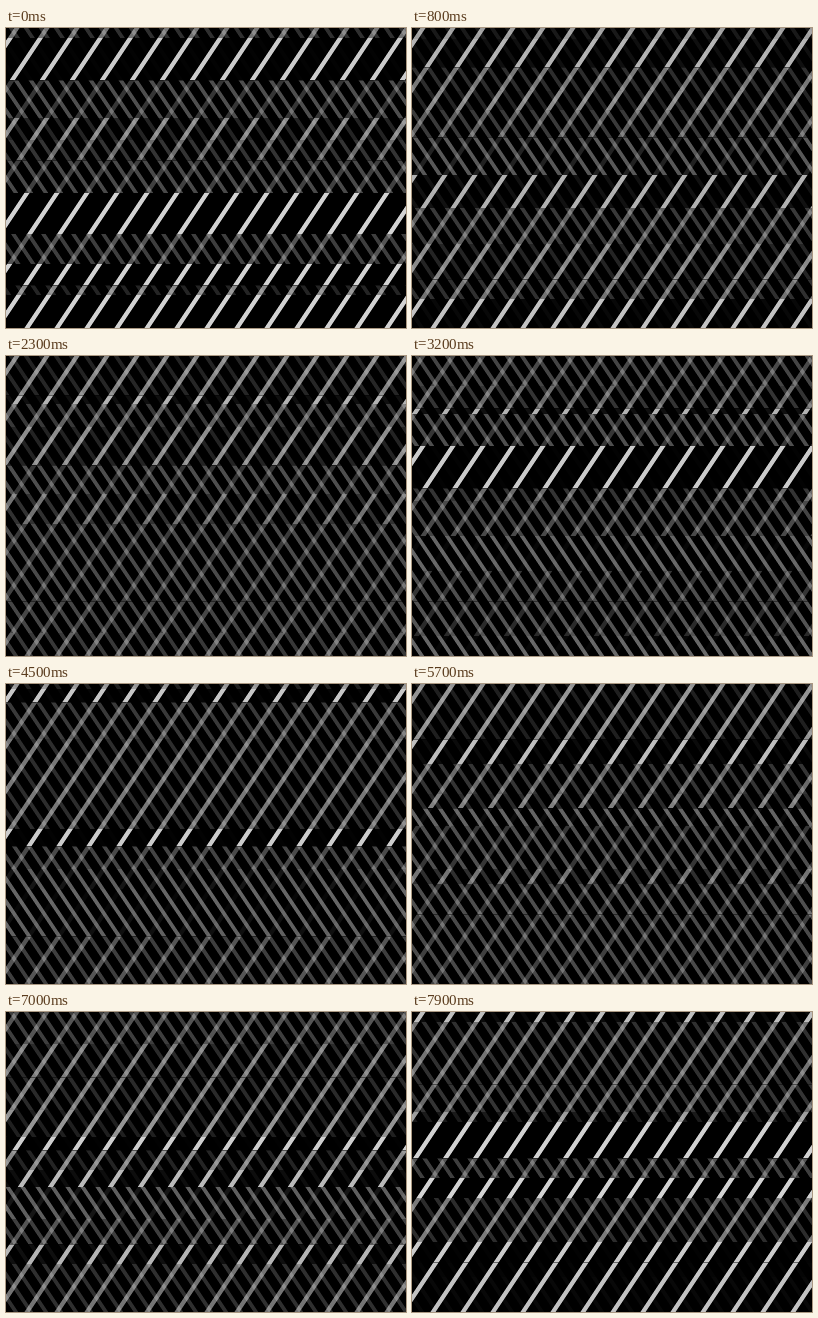
Recreate the animation shown at these times as an HTML page without scripts. Size 400 by 300 pixels, loop 8000 ms.

```html
<!DOCTYPE html>
<html lang="en">
<head>
<meta charset="utf-8">
<title>Crossing hatch</title>
<style>
/* e1–e10: row edges; v0–v10: share of the falling hatch in each row */
@property --e1 { syntax: "<length>"; inherits: true; initial-value: 0px }
@property --e2 { syntax: "<length>"; inherits: true; initial-value: 0px }
@property --e3 { syntax: "<length>"; inherits: true; initial-value: 0px }
@property --e4 { syntax: "<length>"; inherits: true; initial-value: 0px }
@property --e5 { syntax: "<length>"; inherits: true; initial-value: 0px }
@property --e6 { syntax: "<length>"; inherits: true; initial-value: 0px }
@property --e7 { syntax: "<length>"; inherits: true; initial-value: 0px }
@property --e8 { syntax: "<length>"; inherits: true; initial-value: 0px }
@property --e9 { syntax: "<length>"; inherits: true; initial-value: 0px }
@property --e10 { syntax: "<length>"; inherits: true; initial-value: 0px }
@property --v0 { syntax: "<number>"; inherits: true; initial-value: 0 }
@property --v1 { syntax: "<number>"; inherits: true; initial-value: 0 }
@property --v2 { syntax: "<number>"; inherits: true; initial-value: 0 }
@property --v3 { syntax: "<number>"; inherits: true; initial-value: 0 }
@property --v4 { syntax: "<number>"; inherits: true; initial-value: 0 }
@property --v5 { syntax: "<number>"; inherits: true; initial-value: 0 }
@property --v6 { syntax: "<number>"; inherits: true; initial-value: 0 }
@property --v7 { syntax: "<number>"; inherits: true; initial-value: 0 }
@property --v8 { syntax: "<number>"; inherits: true; initial-value: 0 }
@property --v9 { syntax: "<number>"; inherits: true; initial-value: 0 }
@property --v10 { syntax: "<number>"; inherits: true; initial-value: 0 }

html, body { margin: 0; width: 100%; height: 100%; overflow: hidden; background: #000 }

.stage {
  position: relative;
  width: 100%;
  height: 100%;
  isolation: isolate;
  background: #000;
  animation: rows 8s infinite;
}

.stage div {
  position: absolute;
  inset: 0;
  --rows: linear-gradient(
    rgb(0 0 0 / var(--v0)) 0 var(--e1),
    rgb(0 0 0 / var(--v1)) 0 var(--e2),
    rgb(0 0 0 / var(--v2)) 0 var(--e3),
    rgb(0 0 0 / var(--v3)) 0 var(--e4),
    rgb(0 0 0 / var(--v4)) 0 var(--e5),
    rgb(0 0 0 / var(--v5)) 0 var(--e6),
    rgb(0 0 0 / var(--v6)) 0 var(--e7),
    rgb(0 0 0 / var(--v7)) 0 var(--e8),
    rgb(0 0 0 / var(--v8)) 0 var(--e9),
    rgb(0 0 0 / var(--v9)) 0 var(--e10),
    rgb(0 0 0 / var(--v10)) 0);
}

/* both hatches climb 3 px for every 2 across: 30 px and 15 px apart */
.stage .rise {
  background: repeating-linear-gradient(123.69deg,
    #0000 0 6.6px, #d2d2d2 7.4px 10.9px, #0000 11.7px 24.96px);
  mask: linear-gradient(#000 0 0), var(--rows);
  mask-composite: exclude;
}

.stage .fall {
  background: repeating-linear-gradient(56.31deg,
    #0000 0 6px, #686868 6.8px 9.8px, #0000 10.6px 12.48px);
  mask: var(--rows);
  mix-blend-mode: screen;
}

/* dark hairlines on a few edges */
.stage .seam {
  --ink: #0007;
  background: linear-gradient(#0000 var(--e2),
    var(--ink) 0 calc(var(--e2) + 1px), #0000 0 var(--e5),
    var(--ink) 0 calc(var(--e5) + 1px), #0000 0 var(--e9),
    var(--ink) 0 calc(var(--e9) + 1px), #0000 0);
}

@keyframes rows {
  0% {
    --e1: 10px; --e2: 52px; --e3: 90px; --e4: 112px; --e5: 132px;
    --e6: 165px; --e7: 206px; --e8: 236px; --e9: 257px; --e10: 267px;
    --v0: .45; --v1: .03; --v2: .75; --v3: .35; --v4: .5; --v5: .7;
    --v6: 0; --v7: .6; --v8: 0; --v9: .35; --v10: 0;
    animation-timing-function: steps(15);
  }
  18.75% {
    --e1: 12px; --e2: 28px; --e3: 40px; --e4: 55px; --e5: 88px;
    --e6: 132px; --e7: 158px; --e8: 198px; --e9: 245px; --e10: 275px;
    --v0: .06; --v1: .25; --v2: .15; --v3: .35; --v4: .6; --v5: .97;
    --v6: .3; --v7: .5; --v8: .65; --v9: .55; --v10: .15;
    animation-timing-function: steps(17);
  }
  40% {
    --e1: 30px; --e2: 52px; --e3: 58px; --e4: 90px; --e5: 132px;
    --e6: 145px; --e7: 180px; --e8: 215px; --e9: 245px; --e10: 280px;
    --v0: .65; --v1: .5; --v2: .15; --v3: .75; --v4: .03; --v5: .5;
    --v6: .65; --v7: .97; --v8: .75; --v9: .8; --v10: .97;
    animation-timing-function: steps(13);
  }
  56.25% {
    --e1: 5px; --e2: 18px; --e3: 55px; --e4: 145px; --e5: 162px;
    --e6: 185px; --e7: 205px; --e8: 230px; --e9: 252px; --e10: 275px;
    --v0: .3; --v1: .05; --v2: .55; --v3: .43; --v4: .03; --v5: .65;
    --v6: .9; --v7: .97; --v8: .93; --v9: .6; --v10: .6;
    animation-timing-function: steps(12);
  }
  71.25% {
    --e1: 38px; --e2: 55px; --e3: 80px; --e4: 110px; --e5: 124px;
    --e6: 142px; --e7: 185px; --e8: 200px; --e9: 230px; --e10: 265px;
    --v0: .3; --v1: .3; --v2: .1; --v3: .5; --v4: .4; --v5: .95;
    --v6: .75; --v7: .45; --v8: .75; --v9: .7; --v10: .7;
    animation-timing-function: steps(13);
  }
  87.5% {
    --e1: 32px; --e2: 65px; --e3: 98px; --e4: 125px; --e5: 138px;
    --e6: 158px; --e7: 175px; --e8: 207px; --e9: 232px; --e10: 252px;
    --v0: .6; --v1: .4; --v2: .4; --v3: .3; --v4: .02; --v5: .35;
    --v6: .12; --v7: .9; --v8: .6; --v9: .15; --v10: .45;
    animation-timing-function: steps(9);
  }
  98.75%, 100% {
    --e1: 10px; --e2: 72px; --e3: 100px; --e4: 110px; --e5: 146px;
    --e6: 166px; --e7: 186px; --e8: 230px; --e9: 250px; --e10: 265px;
    --v0: .1; --v1: .46; --v2: .5; --v3: .25; --v4: 0; --v5: .6;
    --v6: 0; --v7: .42; --v8: .03; --v9: .05; --v10: .08;
    animation-timing-function: steps(1);
  }
}
</style>
</head>
<body>
<div class="stage">
  <div class="rise"></div>
  <div class="fall"></div>
  <div class="seam"></div>
</div>
</body>
</html>
```
